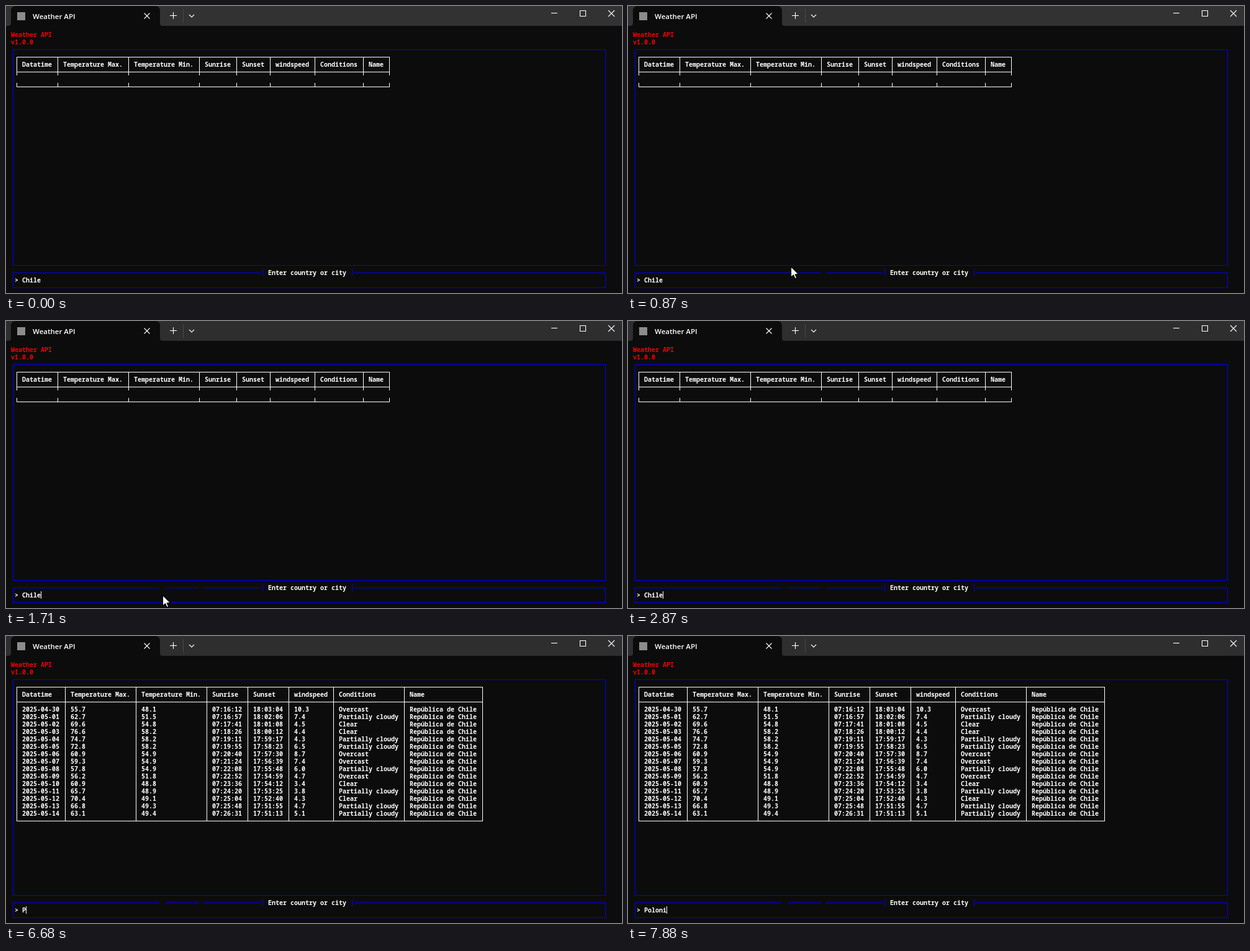
An HTML page with a canvas for the animation above (8 s loop, 992 by 463 pixels).

```html
<!DOCTYPE html>
<html lang="en">
<head>
<meta charset="utf-8">
<title>Weather API</title>
<style>
html, body { margin: 0; width: 100%; height: 100%; overflow: hidden; background: #0c0c0c; }
canvas { display: block; }
</style>
</head>
<body>
<canvas id="stage" width="992" height="463"></canvas>
<script>
const ctx = document.getElementById('stage').getContext('2d');
const LOOP = 8000;
const MOVE = 390, MOVE_END = 1150, MOVE_STEPS = 11;
const CLICK = 1480, CLICK_END = 1710, POINTER_OUT = 2870, RESULT = 2940;
const KEY_TIMES = [6680, 6880, 7080, 7350, 7750, 7880];
const CELL = 6, LINE = 12;
const BG = '#0c0c0c', WHITE = '#ffffff', BLUE = '#0000ff', RED = '#f00000';
const MONO = '600 10px "Noto Sans Mono", "DejaVu Sans Mono", monospace';

// Linear interpolation through [position, value] points
function along(points, at) {
  const i = Math.max(1, points.findIndex(p => p[0] >= at));
  const [a, from] = points[i - 1], [b, to] = points[i];
  return from + (to - from) * (at - a) / (b - a);
}

const HEADS = ['Datatime', 'Temperature Max.', 'Temperature Min.', 'Sunrise', 'Sunset', 'windspeed', 'Conditions', 'Name'];
const SKY = { O: 'Overcast', P: 'Partially cloudy', C: 'Clear' };
const HIGHS = [[0, 55.7], [3, 76.6], [5, 72.8], [6, 60.9], [9, 56.2], [12, 70.4], [14, 63.1]];
const LOWS = [[0, 48.1], [3, 58.2], [5, 58.2], [6, 54.9], [8, 54.9], [10, 48.8], [14, 49.4]];
const WINDS = [[0, 10.3], [2, 4.5], [4, 4.3], [6, 8.7], [10, 3.4], [14, 5.1]];

// Sunrise and sunset drift by a quadratic number of seconds per day
function forecast(sky, day) {
  const iso = seconds => new Date(Date.UTC(2025, 3, 30 + day, 0, 0, seconds)).toISOString();
  const clock = seconds => iso(seconds).slice(11, 19);
  const sunrise = 7 * 3600 + 972 + Math.floor(44.86 * day - 0.044 * day * day + 0.43);
  const sunset = 18 * 3600 + 184 - Math.floor(59.35 * day - 0.608 * day * day + 0.25);
  const values = [HIGHS, LOWS, WINDS].map(points => along(points, day).toFixed(1));
  return [iso(0).slice(0, 10), values[0], values[1], clock(sunrise), clock(sunset), values[2], SKY[sky], 'República de Chile'];
}
const FORECAST = [...'OPCCPPOOPOCPCPP'].map(forecast);

function rect(x, y, w, h, color) {
  ctx.fillStyle = color;
  ctx.fillRect(x, y, w, h);
}

// Text centred on a terminal row
function text(str, x, rowY, color = WHITE) {
  ctx.font = MONO;
  ctx.fillStyle = color;
  ctx.fillText(str, x, rowY + 4);
}

function stroke(points, color = WHITE, close = false) {
  ctx.beginPath();
  points.forEach(([x, y]) => ctx.lineTo(x, y));
  if (close) ctx.closePath();
  ctx.strokeStyle = color;
  ctx.lineWidth = 1.1;
  ctx.stroke();
}

function cross(x, y, r) {
  stroke([[x - r, y - r], [x + r, y + r]]);
  stroke([[x + r, y - r], [x - r, y + r]]);
}

function titleBar(t) {
  rect(0, 0, 992, 32, t < CLICK ? '#323232' : '#2e2e2e');

  ctx.fillStyle = BG;
  ctx.beginPath();
  ctx.moveTo(4, 32);
  ctx.quadraticCurveTo(8, 32, 8, 28);
  ctx.lineTo(8, 8);
  ctx.quadraticCurveTo(8, 0, 16, 0);
  ctx.lineTo(240, 0);
  ctx.quadraticCurveTo(248, 0, 248, 8);
  ctx.lineTo(248, 28);
  ctx.quadraticCurveTo(248, 32, 252, 32);
  ctx.fill();

  rect(18, 10, 13, 13, '#8c8c8c');
  ctx.font = '600 11.5px "Open Sans", "Noto Sans", sans-serif';
  ctx.fillStyle = WHITE;
  ctx.fillText('Weather API', 43, 21);

  cross(227, 16, 4.5);
  stroke([[264, 15.5], [275, 15.5]]);
  stroke([[269.5, 10], [269.5, 21]]);
  rect(285, 5, 1, 22, '#484848');
  stroke([[295, 14], [299, 18], [303, 14]]);

  stroke([[878, 11.5], [888, 11.5]]);
  stroke([[924.5, 7.5], [933.5, 7.5], [933.5, 16.5], [924.5, 16.5]], WHITE, true);
  cross(975, 12, 5);
}

function panels(t) {
  for (const x of [11, 965]) {
    rect(x, 70, 1, 349, BLUE);
    rect(x, 430, 1, 25, BLUE);
  }
  for (const y of [70, 418, 430, 454]) rect(11, y, 955, 1, BLUE);
  // Breaks the pointer leaves in the prompt border
  if (t >= 870) rect(311, 430, 7, 1, BG);
  if (t >= CLICK) rect(247, 430, 10, 1, BG);
  rect(410, 424, 150, LINE, BG);
  for (const x of [413, 557]) rect(x, 424, 1, LINE, BLUE);
  text('Enter country or city', 422, 430);
}

function table(t) {
  const rows = t >= RESULT ? FORECAST : [];
  const full = rows.length > 0;
  const cols = [17];
  HEADS.forEach((head, i) => {
    const chars = Math.max(head.length, ...rows.map(r => r[i].length));
    cols.push(cols[i] + (chars + 3) * CELL);
  });
  const bottom = 118 + LINE * Math.max(1, rows.length);
  const width = cols[HEADS.length] - cols[0] + 1;
  for (const y of [82, 106, bottom]) rect(cols[0], y, width, 1, WHITE);
  for (const x of cols) {
    rect(x, 82, 1, bottom - 81, WHITE);
    if (!full) rect(x, 112, 1, LINE, BG);
  }
  const row = (cells, y) => cells.forEach((cell, i) => text(cell, cols[i] + 9, y));
  row(HEADS, 94);
  rows.forEach((cells, i) => row(cells, 118 + LINE * i));
}

function prompt(t) {
  const typed = t < RESULT ? 'Chile' : 'Poloni'.slice(0, KEY_TIMES.filter(k => t >= k).length);
  text('> ' + typed, 14, 442);
  if (t >= CLICK) rect(26 + CELL * typed.length, 436, 1, LINE, WHITE);
}

// Sweeps left and up, then settles on the prompt
function pointerAt(t) {
  const step = Math.min(MOVE_STEPS, Math.floor((t - MOVE) / (MOVE_END - MOVE) * MOVE_STEPS + 0.1));
  const x = along([[0, 826], [6, 311], [7, 262], [MOVE_STEPS, 252]], step);
  const y = along([[0, 455], [7, 420], [MOVE_STEPS, 442]], step);
  return [Math.round(x), Math.round(y)];
}

function pointer(t) {
  if (t < MOVE || t >= POINTER_OUT) return;
  const [x, y] = pointerAt(t);
  if (t >= CLICK && t < CLICK_END) {
    ctx.fillStyle = 'rgba(255, 255, 0, 0.47)';
    ctx.beginPath();
    ctx.arc(x, y, 12, 0, Math.PI * 2);
    ctx.fill();
  }
  const shape = [[0, 0], [0, 17], [4, 13.4], [6.6, 19.3], [9.2, 18.2], [6.7, 12.4], [12, 12]];
  const points = shape.map(([dx, dy]) => [x + 0.5 + dx, y + 0.5 + dy]);
  ctx.fillStyle = WHITE;
  ctx.beginPath();
  points.forEach(p => ctx.lineTo(...p));
  ctx.fill();
  stroke(points, '#000000', true);
}

function draw(t) {
  rect(0, 0, 992, 463, BG);
  titleBar(t);
  text('Weather API', 8, 46, RED);
  text('v1.0.0', 8, 58, RED);
  panels(t);
  table(t);
  prompt(t);
  pointer(t);
}

const start = performance.now();
function tick() {
  draw((performance.now() - start) % LOOP);
  requestAnimationFrame(tick);
}
tick();
</script>
</body>
</html>
```
